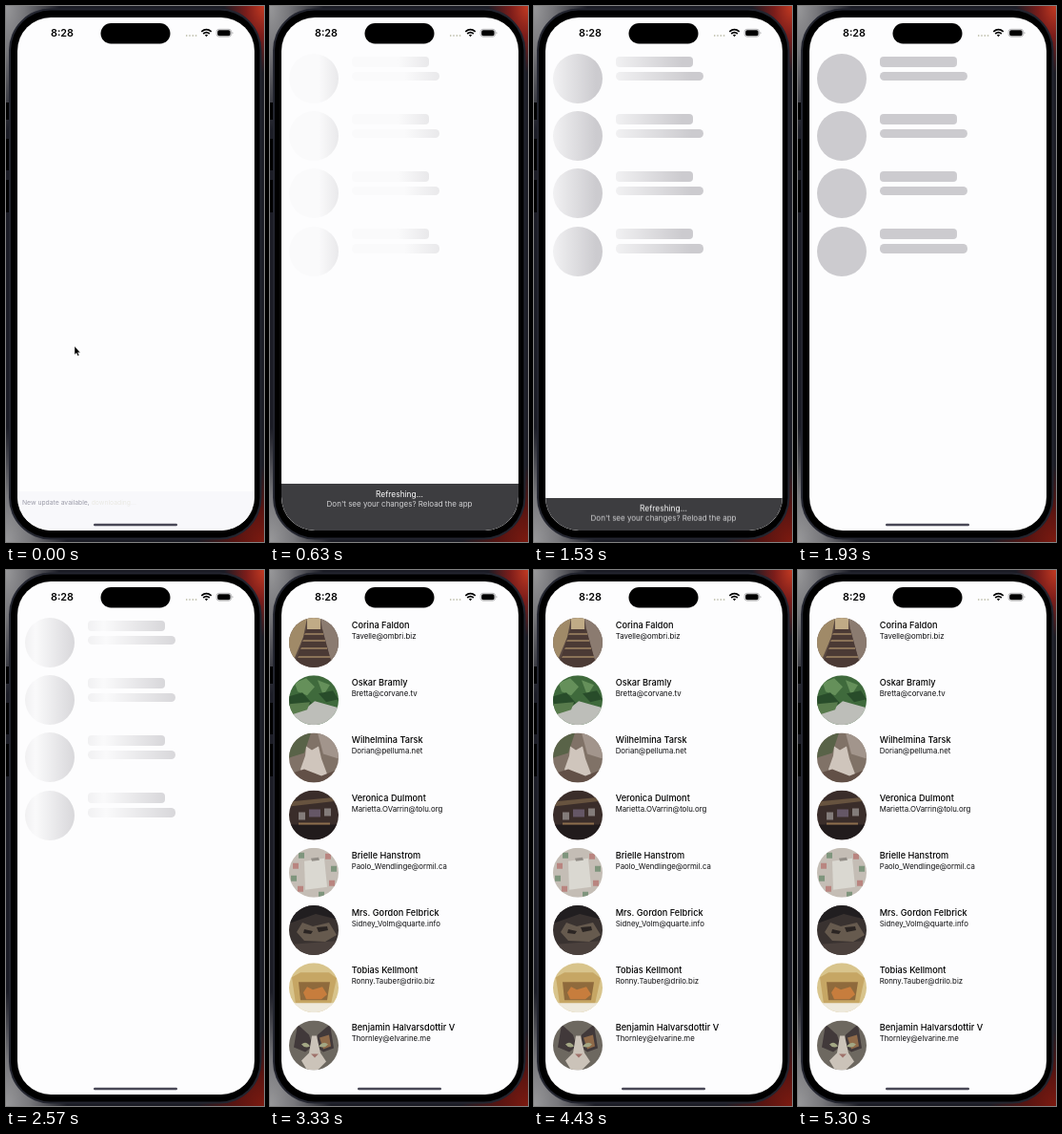
Recreate the animation shown at these times as an HTML page. Size 271 by 561 pixels, loop 5330 ms.

```html
<!DOCTYPE html>
<html lang="en">
<head>
<meta charset="utf-8">
<title>Contact list loading</title>
<style>
  html, body { margin: 0; width: 100%; height: 100%; overflow: hidden; background: #1b1c25; }
  body { position: relative; font-family: Inter, "Liberation Sans", sans-serif; }
  svg { position: absolute; left: 0; top: 0; width: 271px; height: 561px; display: block; }
  #desk {
    position: absolute; left: 0; top: 0; width: 271px; height: 561px;
    background:
      radial-gradient(56px 130px at 0 0, #98989a, #77777b 35%, transparent),
      radial-gradient(64px 120px at 0 100%, #98989a, #77777b 40%, transparent),
      radial-gradient(42px 70px at 100% 0, #c23a22, #7c1d1a 45%, transparent),
      radial-gradient(70px 80px at 100% 100%, #7c1a10, #571411 45%, transparent),
      #1b1c25;
  }
  #screen {
    position: absolute; left: 11.5px; top: 12px; width: 249px; height: 537px;
    border-radius: 35px; overflow: hidden; background: #fdfdfe;
  }
  /* inner layers use stage coordinates */
  #stage { position: absolute; left: -11.5px; top: -12px; width: 271px; height: 561px; }
  .layer { position: absolute; inset: 0; }

  .name { font-size: 9.2px; font-weight: 500; fill: #000; }
  .mail { font-size: 7.8px; fill: #0b0b0d; }
  .clock { font-size: 10.8px; font-weight: 600; fill: #000; }

  .bone { position: absolute; overflow: hidden; }
  .bone i {
    position: absolute; left: 0; top: 0; width: 600%; height: 100%;
    background: linear-gradient(90deg, #fafafb 10%, #cccbcf 28%, #cccbcf 46%,
      #fafafb 64%, #cccbcf 82%, #fafafb 100%);
    animation: shimmer 5330ms infinite;
  }
  #banner {
    position: absolute; left: 11px; top: 500px; width: 250px; height: 52px;
    background: #3d3d40; color: #fff; text-align: center;
  }
  #banner p { position: absolute; left: 0; right: 0; margin: 0; line-height: 10px; white-space: nowrap; }

  #bones, #list, #early, #late, #pointer { animation: 5330ms step-end infinite; }
  #bones { animation-name: bones; }
  #list { animation-name: list; }
  #early { animation-name: early; }
  #late { animation-name: late; }
  #pointer { animation-name: pointer; }
  #notice { animation: notice 5330ms linear infinite; }
  #banner { animation: banner 5330ms linear infinite; }

  @keyframes shimmer {
    0% { transform: translateX(0); }
    13% { transform: translateX(0); animation-timing-function: cubic-bezier(.455, .03, .515, .955); }
    69.3%, 100% { transform: translateX(-83.333%); }
  }
  @keyframes bones { 0% { opacity: 0; } 9.2% { opacity: 1; } 55.4%, 100% { opacity: 0; } }
  @keyframes list { 0% { opacity: 0; } 55.4%, 100% { opacity: 1; } }
  @keyframes early { 0% { opacity: 1; } 92%, 100% { opacity: 0; } }
  @keyframes late { 0% { opacity: 0; } 92%, 100% { opacity: 1; } }
  @keyframes pointer { 0% { opacity: 1; } 9.2%, 100% { opacity: 0; } }
  @keyframes notice { 0% { opacity: 1; } 3%, 100% { opacity: 0; } }
  @keyframes banner {
    0% { opacity: 0; transform: none; animation-timing-function: step-end; }
    5.6% { opacity: 1; transform: none; }
    27.2% { opacity: 1; transform: none; animation-timing-function: cubic-bezier(.33, 0, .67, .33); }
    30%, 100% { opacity: 1; transform: translateY(50px); }
  }
</style>
</head>
<body>
<div id="desk"></div>
<svg viewBox="0 0 271 561">
  <path d="M1.5 101V119M1.5 139V172M1.5 182V216" stroke="#000" stroke-width="3"/>
  <rect x="3" y="2.5" width="265.5" height="556" rx="44" fill="#23252f"/>
  <rect x="5" y="4.5" width="261.5" height="552" rx="42" fill="#000"/>
</svg>

<div id="screen"><div id="stage">
  <div id="bones" class="layer"></div>
  <svg id="list" viewBox="0 0 271 561">
    <defs><clipPath id="round"><circle cx="26" cy="26" r="26"/></clipPath></defs>
  </svg>
  <svg viewBox="0 0 271 561">
    <g id="notice">
      <rect x="11" y="508" width="250" height="41" fill="#f8f8fb"/>
      <text x="17" y="522" font-size="6.8" fill="#9b9ba8">New update available, <tspan fill="#e9e8e2">downloading...</tspan></text>
    </g>
    <rect x="92" y="541.7" width="88" height="2.5" rx="1.25" fill="#484756"/>
    <text id="early" class="clock" x="47" y="32">8:28</text>
    <text id="late" class="clock" x="47" y="32">8:29</text>
    <rect x="99.5" y="18" width="73" height="21.5" rx="10.75" fill="#000"/>
    <path d="M189 31H201" stroke="#b9b9a4" stroke-width="1.3" stroke-dasharray="1.4 1.9"/>
    <g fill="none" stroke="#000" stroke-width="1.7">
      <path d="M205.3 26.8Q210.5 22.3 215.7 26.8M207.2 29Q210.5 26.2 213.8 29"/>
      <path d="M210.5 32.2L208.9 30.4Q210.5 29.2 212.1 30.4Z" fill="#000" stroke="none"/>
    </g>
    <rect x="221.2" y="24.3" width="15.4" height="7.8" rx="2.6" fill="none" stroke="#a4a4a6" stroke-width=".8"/>
    <rect x="222.2" y="25.2" width="13.4" height="6" rx="1.7" fill="#000"/>
    <path d="M237.6 26.8Q239.2 28.2 237.6 29.6Z" fill="#8c8c8e"/>
    <path id="pointer" d="M72 356V365L74 363.2L75.4 366.3L76.9 365.6L75.5 362.7H78Z" fill="#000" stroke="#fff" stroke-width=".4"/>
  </svg>
  <div id="banner">
    <p style="top:6px;font-size:8.4px">Refreshing...</p>
    <p style="top:16px;font-size:8px;color:#d2d2d4">Don't see your changes? Reload the app</p>
  </div>
</div></div>

<script>
  const pitch = 60.2;

  // Each photo: base tone, then [tone, path] shapes in a 52 x 52 box.
  const people = [
    ["Corina Faldon", "Tavelle@ombri.biz", "#5b4a42", [
      ["#a08a68", "M0 0H19L15 20L5 44H0Z"], ["#8b7b70", "M33 0H52V52H46L36 18Z"],
      ["#c0ab86", "M19 0H33V12H19Z"], ["#4b3a35", "M18 12H35L46 52H5Z"],
      ["#8b7358", "M17 16H36V18H16ZM15 23H38V25H14ZM13 31H40V33H12ZM10 40H43V42H9Z"]]],
    ["Oskar Bramly", "Bretta@corvane.tv", "#3f6a3c", [
      ["#65905a", "M6 8L18 3L27 12L19 21L9 17ZM30 5L43 10L36 21Z"],
      ["#284c2a", "M0 22L14 18L24 29L12 36L0 33ZM31 19L46 16L52 25L39 28Z"],
      ["#bdbeb9", "M0 41L17 35L27 27L52 34V52H0Z"], ["#587b4c", "M0 30L22 28L19 36L0 42Z"]]],
    ["Wilhelmina Tarsk", "Dorian@pelluma.net", "#807267", [
      ["#596348", "M0 0H23L16 21L0 26Z"], ["#a2958c", "M30 0H52V27L36 22Z"],
      ["#cfc5bc", "M17 24L18 14L24 18L31 14L34 27L40 43L31 48H16L12 38Z"],
      ["#625047", "M0 43L16 38L34 45L52 38V52H0Z"]]],
    ["Veronica Dulmont", "Marietta.OVarrin@tolu.org", "#3a2d2a", [
      ["#67533f", "M0 12L52 7V11L0 17Z"], ["#837c7a", "M10 23H17V31H10ZM37 19H44V27H37Z"],
      ["#655766", "M21 20H33V28H21Z"], ["#211b1c", "M0 36H52V52H0Z"],
      ["#8d6e4d", "M10 34H43V36H10Z"]]],
    ["Brielle Hanstrom", "Paolo_Wendlinge@ormil.ca", "#c4bdb5", [
      ["#b98580", "M4 16H10V22H4ZM38 6H44V12H38ZM42 34H48V40H42ZM9 40H15V46H9Z"],
      ["#7f957d", "M10 5H16V11H10ZM44 19H50V25H44ZM2 29H8V35H2ZM31 46H37V51H31Z"],
      ["#dad8d1", "M16 14L37 11L40 41L17 44Z"], ["#918c86", "M23 11L31 10L32 13L24 14Z"]]],
    ["Mrs. Gordon Felbrick", "Sidney_Volm@quarte.info", "#393230", [
      ["#211e20", "M0 0H52V15L28 9L0 19Z"], ["#665a4e", "M8 28L14 18L25 22L42 18L50 31L38 38L16 37Z"],
      ["#2b2523", "M16 25L25 27L23 30L15 29ZM29 23L40 22L41 26L31 28Z"],
      ["#4b413d", "M0 41L52 37V52H0Z"]]],
    ["Tobias Kellmont", "Ronny.Tauber@drilo.biz", "#d8c48c", [
      ["#c6a664", "M3 15L12 10H42L50 16L44 43H7Z"], ["#8f6a3c", "M10 20H43L40 39H12Z"],
      ["#c77d3d", "M15 31L19 25L25 28L35 25L40 33L34 38H18Z"],
      ["#eee9dc", "M0 42H52V52H0Z"]]],
    ["Benjamin Halvarsdottir V", "Thornley@elvarine.me", "#6d6860", [
      ["#41393a", "M5 28L9 4L21 15L25 27L17 33ZM30 15L43 4L47 29L36 33L28 27Z"],
      ["#8f6a49", "M32 18L42 15L44 27L36 30Z"],
      ["#cbc3b9", "M24 16H29L33 34L39 43L30 52H19L13 42L21 34Z"],
      ["#a3a784", "M13 25Q18 21 22 27Q17 30 13 25ZM31 27Q36 21 41 25Q37 30 31 27Z"],
      ["#9f726b", "M23 35H31L27 39Z"]]]
  ];

  const photo = (base, shapes) =>
    `<rect width="52" height="52" fill="${base}"/>` +
    shapes.map(([tone, d]) => `<path d="${d}" fill="${tone}"/>`).join("");

  document.getElementById("list").insertAdjacentHTML("beforeend",
    people.map(([name, mail, base, shapes], i) => `
      <g transform="translate(0 ${i * pitch})">
        <g transform="translate(20 50)" clip-path="url(#round)">${photo(base, shapes)}</g>
        <text class="name" x="85.7" y="61">${name}</text>
        <text class="mail" x="85.7" y="72">${mail}</text>
      </g>`).join(""));

  const bone = (x, y, w, h, r) =>
    `<div class="bone" style="left:${x}px;top:${y}px;width:${w}px;height:${h}px;border-radius:${r}px"><i></i></div>`;

  let rows = "";
  for (let i = 0; i < 4; i++) {
    const y = i * pitch;
    rows += bone(20, y + 50, 52, 52, 26) + bone(86, y + 52.5, 80.5, 11, 4) + bone(86, y + 68.7, 92, 9.3, 4.6);
  }
  document.getElementById("bones").innerHTML = rows;
</script>
</body>
</html>
```
